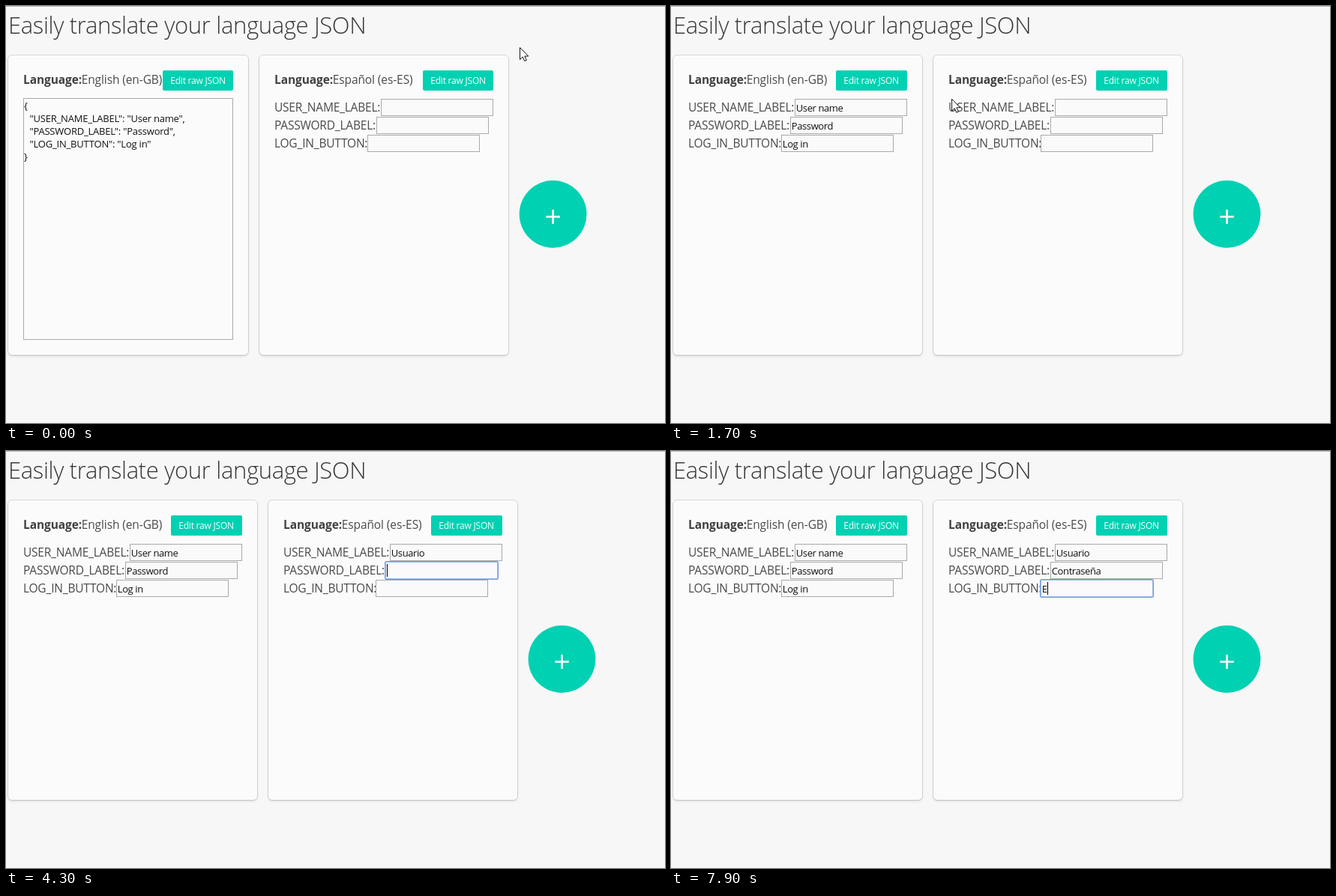
Recreate the animation shown at these times as an HTML page. Size 879 by 557 pixels, loop 8 s.

```html
<!DOCTYPE html>
<html lang="en">
<head>
<meta charset="utf-8">
<title>Translate JSON</title>
<style>
  html, body { margin: 0; width: 100%; height: 100%; overflow: hidden; background: #f7f7f7; }
  svg { display: block; font-family: "Open Sans", "Noto Sans", sans-serif; }
  .title { font-size: 31px; font-weight: 300; letter-spacing: -.35px; fill: #363636; }
  .lang { font-size: 15.5px; letter-spacing: -.1px; fill: #4a4a4a; }
  .bold { font-weight: 700; fill: #404040; }
  .label { font-size: 15.5px; letter-spacing: -.22px; fill: #4a4a4a; }
  .value { font-size: 13px; letter-spacing: -.4px; fill: #111; }
  .code { font-size: 13px; letter-spacing: -.22px; fill: #111; }
  .btn { font-size: 12px; letter-spacing: -.2px; fill: #fff; }
  .card { fill: #fbfbfb; filter: drop-shadow(0 2px 1.5px rgba(10, 10, 10, .1)); }
  .ring { fill: none; stroke: rgba(10, 10, 10, .13); }
</style>
</head>
<body>
<svg id="stage" width="879" height="557" viewBox="0 0 879 557"></svg>
<script>
const LOOP = 8000, STEP = 100;
const stage = document.getElementById('stage');
const LABELS = ['USER_NAME_LABEL', 'PASSWORD_LABEL', 'LOG_IN_BUTTON'];
const ENGLISH = ['User name', 'Password', 'Log in'];
const WORDS = ['Usuario', 'Contraseña', 'E'];
// Moment at which each letter is typed, per field
const KEYS = [
  [3500, 3600, 3800, 3900, 4000, 4100, 4200],
  [4700, 4900, 5000, 5100, 5300, 5300, 5400, 5800, 6100, 6200],
  [7900]
];
const FOCUS = [2200, 4300, 7100];
// Spans in which the caret is hidden
const BLINKS = [[2700, 3200], [6700, 7100], [7700, 7900]];
const GREEN = '#00d1b2';
const CURSORS = {
  arrow: '<path d="M.5 .5V16.5L4.2 13L6.8 18.6L9.3 17.4L6.8 12H11.8Z" fill="#fff" stroke="#111"/>',
  hand: '<path d="M-1.7 1.2Q0-1.2 1.7 1.2V7Q4.4 5.8 5 8Q7.4 7 8 9Q9.4 8.8 9.4 11V16Q9 19 7.5 20V22.5H-2.5V20Q-4 16-6.6 13Q-7.6 10.6-5.2 10.6L-1.7 13.4Z" fill="#fff" stroke="#111" stroke-width="1.1"/>',
  beam: '<path d="M-3-7.5H-1L0-6.8L1-7.5H3M0-7V7M-3 7.5H-1L0 6.8L1 7.5H3" fill="none" stroke="#111" stroke-width="1.2"/>'
};

const text = (x, y, cls, str) => `<text x="${x}" y="${y}" class="${cls}">${str}</text>`;
const rect = (x, y, w, h, attrs) => `<rect x="${x}" y="${y}" width="${w}" height="${h}" ${attrs}/>`;
const mix = (a, b, u) => a + (b - a) * u;
const curve = (a, c, b, u) => mix(mix(a, c, u), mix(c, b, u), u);
const within = (p, x0, y0, x1, y1) => p.x >= x0 && p.x < x1 && p.y >= y0 && p.y < y1;

function panel(x, w) {
  return rect(x + 1, 66, w - 2, 400, 'rx="5" class="card"') +
    rect(x + .5, 65.5, w - 1, 401, 'rx="5.5" class="ring"');
}

function heading(x, name) {
  return text(x, 104, 'lang bold', 'Language:') + text(x + 77.7, 104, 'lang', name);
}

function button(x, w, fill) {
  return rect(x, 86, w, 27, `rx="2" fill="${fill}"`) + text(x + 10.2, 104, 'btn', 'Edit raw JSON');
}

function fields(x, offsets, values, focus) {
  return LABELS.map((name, i) => {
    const left = x + offsets[i], top = 124 + i * 24, active = i === focus;
    const box = active
      ? rect(left - .5, top - .5, 151, 24, 'rx="1.5" fill="#fafafa" stroke="#6f9be0"') +
        rect(left + .5, top + .5, 149, 22, 'fill="none" stroke="#9dbbe8"')
      : rect(left + .5, top + .5, 149, 22, 'fill="#fafafa" stroke="#a9a9a9"');
    const id = active ? 'id="typed" ' : '';
    return text(x, top + 17, 'label', name + ':') + box +
      `<text ${id}x="${left + 1.8}" y="${top + 17}" class="value">${values[i]}</text>`;
  }).join('');
}

function rawEditor() {
  const rows = LABELS.map((name, i) => `"${name}": "${ENGLISH[i]}"${i < 2 ? ',' : ''}`);
  return rect(23.5, 123.5, 279, 322, 'fill="#fbfbfb" stroke="#a9a9a9"') +
    text(24, 138, 'code', '{') +
    rows.map((row, i) => text(31.5, 155 + i * 17, 'code', row)).join('') +
    text(24, 206, 'code', '}');
}

function plus(x) {
  return `<circle cx="${x}" cy="278" r="44.9" fill="${GREEN}"/>` +
    `<path d="M${x - 9.2} 281.5h18.5M${x} 272v19" stroke="#fff" stroke-width="2.6"/>`;
}

function pointer(t) {
  if (t < 500) {
    const u = t / 500;
    return { x: curve(685, 500, 256, u), y: curve(55, 242, 98, u) };
  }
  if (t < 1500) {
    const u = Math.max(0, Math.min(1, (t - 600) / 200));
    return { x: mix(256, 253.5, u), y: mix(98, 94, u) };
  }
  if (t < 2300) {
    const u = Math.min(1, (t - 1400) / 700), s = u * u * (3 - 2 * u);
    return { x: mix(253.5, 560, s), y: curve(94, 142, 138, s) };
  }
  if (t < 2400) return { x: 560, y: 128 };
  return t < 2500 ? { x: 499, y: 59 } : null;
}

function cursor(p, kind) {
  return `<g transform="translate(${p.x.toFixed(1)} ${p.y.toFixed(1)})">${CURSORS[kind]}</g>`;
}

function render(t) {
  const raw = t < 1000;
  const x = raw ? 358 : 370;
  const left = raw ? 209 : 220;
  const btnWidth = raw ? 94 : 95;
  const p = pointer(t);
  const hover = p && within(p, left, 86, left + btnWidth, 113);
  const fill = !hover ? GREEN : t >= 900 && raw ? '#00b59a' : '#00c4a7';
  const focus = FOCUS.filter(f => t >= f).length - 1;
  const typed = WORDS.map((word, i) => word.slice(0, KEYS[i].filter(k => t >= k).length));
  const offsets = raw ? [142, 136, 124] : [142, 136, 123];

  let out = rect(0, 0, 879, 557, 'fill="#f7f7f7"') + rect(0, 0, 879, 1, 'fill="#b8b8b8"') +
    text(3, 37, 'title', 'Easily translate your language JSON') +
    panel(2, raw ? 322 : 334) + heading(23, 'English (en-GB)') +
    button(left, btnWidth, fill) +
    (raw ? rawEditor() : fields(23, [142, 136, 124], ENGLISH, -1)) +
    panel(raw ? 337 : 349, 334) + heading(x, 'Español (es-ES)') +
    button(raw ? 556 : 567, btnWidth, GREEN) +
    fields(x, offsets, typed, focus) + plus(raw ? 729.6 : 741.5);

  if (focus >= 0 && !BLINKS.some(([off, on]) => t >= off && t < on)) {
    out += rect(0, 127 + focus * 24, 1, 17, 'id="caret" fill="#000"');
  }
  if (p) {
    const overText = within(p, x, 124, x + 292, 195) ||
      (!raw && within(p, 23, 124, 315, 195)) || within(p, x, 90, x + 184, 110);
    out += cursor(p, hover ? 'hand' : overText ? 'beam' : 'arrow');
  }
  stage.innerHTML = out;

  const caret = document.getElementById('caret');
  if (caret) {
    const start = x + offsets[focus] + 2;
    const width = typed[focus] ? document.getElementById('typed').getComputedTextLength() : 0;
    caret.setAttribute('x', Math.round(start + width));
  }
}

let last = -1;
function tick() {
  const t = Math.floor(performance.now() % LOOP / STEP) * STEP;
  if (t !== last) render(last = t);
  requestAnimationFrame(tick);
}
tick();
</script>
</body>
</html>
```
